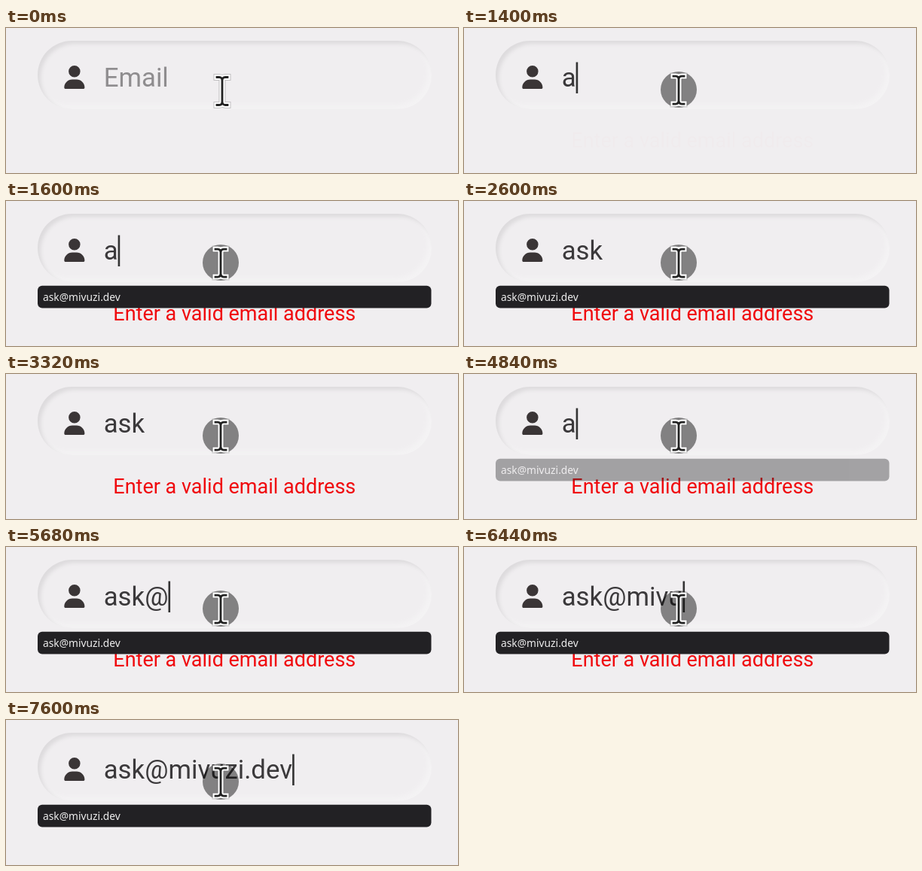
These frames come from a looping animation (600x193 px, 8000 ms). An HTML page:

```html
<!DOCTYPE html>
<html lang="en">
<head>
<meta charset="utf-8">
<title>Email field</title>
<style>
  html, body { margin: 0; width: 100%; height: 100%; overflow: hidden; background: #f0eef0; }
  .field {
    position: absolute; left: 42px; top: 17px; width: 523px; height: 91px; border-radius: 46px;
    box-shadow: inset 4px 4px 5px #dddbdd, inset -5px -5px 6px #f4f3f4;
  }
  svg { position: absolute; left: 0; top: 0; display: block; }
  text { font-family: Roboto, Arial, sans-serif; white-space: pre; }
  #value { font-size: 34.8px; }
  #error { font-size: 27px; fill: #f00a0e; text-anchor: middle; }
  #popup text { font: 500 13.8px "Noto Sans", "Open Sans", sans-serif; fill: #eee; }
  #beam path { fill: none; stroke-linecap: square; stroke-linejoin: round; }
</style>
</head>
<body>
<div class="field"></div>
<svg width="600" height="193" viewBox="0 0 600 193">
  <path fill="#3a3536" transform="translate(77.3 50) scale(.0605)"
    d="M224 256A128 128 0 1 0 224 0a128 128 0 1 0 0 256zm-46 48C80 304 0 384 0 482c0 17 13 30 30 30h388c17 0 30-13 30-30C448 384 368 304 270 304z"/>
  <text id="value" x="129.7" y="78"></text>
  <rect id="caret" y="45.5" width="2.6" height="41.5" fill="#333"/>
  <text id="error" x="303.3" y="158.6">Enter a valid email address</text>
  <g id="popup">
    <rect x="42" y="112.8" width="522.5" height="29.6" rx="6" fill="#222124"/>
    <text id="suggestion" x="49" y="133"></text>
  </g>
  <circle id="press" cx="285" cy="82" r="24" fill="#000"/>
  <g id="beam">
    <path id="shape" d="M-7 -18.5H-4Q0 -18.5 0 -14V14Q0 18.5 -4 18.5H-7M7 -18.5H4Q0 -18.5 0 -14M0 14Q0 18.5 4 18.5H7"/>
  </g>
</svg>
<script>
const LOOP = 8000;
const EMAIL = 'ask@mivuzi.dev';
const $ = id => document.getElementById(id);
const [value, caret, error, popup, press, beam, shape] =
  ['value', 'caret', 'error', 'popup', 'press', 'beam', 'shape'].map($);

$('suggestion').textContent = EMAIL;

// Pointer layers: soft shadow, white edge, dark core.
function outline(color, width, opacity = 1) {
  const layer = shape.cloneNode();
  layer.removeAttribute('id');
  layer.style.cssText = `stroke:${color};stroke-width:${width};stroke-opacity:${opacity}`;
  beam.append(layer);
}
outline('#555', 9, .3);
outline('#fff', 7);
outline('#222', 2.8);
shape.remove();

// Each burst types its text one letter per gap; the caret stays lit for hold.
const burst = (at, text, { gap = 1, hold = LOOP, clear = false } = {}) =>
  ({ at, text, gap, hold, clear });
const bursts = [
  burst(1400, 'a'),
  burst(1880, 'sk', { hold: 720 }),
  burst(3440, '', { hold: 0, clear: true }),
  burst(4640, ''),
  burst(4800, 'a'),
  burst(5080, 'sk'),
  burst(5680, '@', { hold: 160 }),
  burst(6040, 'mivuzi', { gap: 130, hold: 960 }),
  burst(7240, '.dev', { gap: 110 })
];

function fieldAt(t) {
  let text = '', lit = false;
  for (const b of bursts.filter(b => b.at <= t)) {
    const letters = Math.floor((t - b.at) / b.gap) + 1;
    text = (b.clear ? '' : text) + b.text.slice(0, letters);
    lit = t < b.at + b.hold;
  }
  return { text, lit };
}

const ramp = (t, from, to) => Math.min(1, Math.max(0, (t - from) / (to - from)));

function draw(t) {
  const { text, lit } = fieldAt(t);
  value.textContent = text || 'Email';
  value.setAttribute('fill', text ? '#3b393b' : '#8f8d8f');

  const width = text ? value.getComputedTextLength() : 0;
  caret.setAttribute('x', 129.7 + width);
  caret.setAttribute('opacity', lit ? 1 : 0);

  error.setAttribute('opacity', t < 7400 ? ramp(t, 1400, 1520) : 0);
  popup.setAttribute('opacity', t < 3320 ? ramp(t, 1440, 1580) : ramp(t, 4800, 4910));

  const down = ramp(t, 20, 180);
  press.setAttribute('opacity', .46 * down);
  beam.setAttribute('transform', `translate(${287 - 2 * down} ${84 - 1.4 * down})`);
}

function tick(now) {
  draw(now % LOOP);
  requestAnimationFrame(tick);
}
draw(0);
requestAnimationFrame(tick);
</script>
</body>
</html>
```
